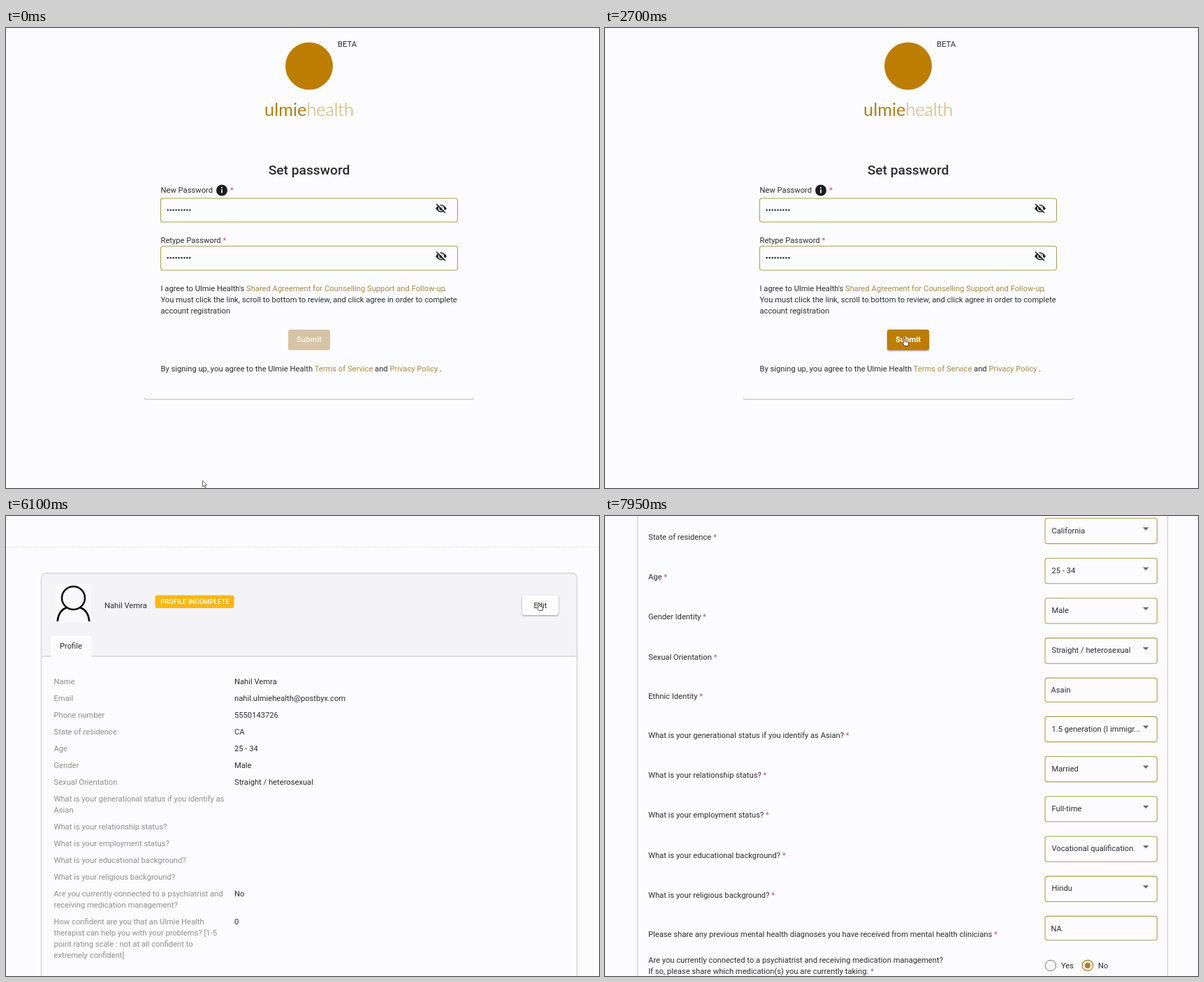
These frames come from a looping animation (849 px wide and 659 px high, 8 s). An HTML page:

```html
<!DOCTYPE html>
<html lang="en">
<head>
<meta charset="utf-8">
<title>Account set-up</title>
<style>
html, body { margin: 0; width: 100%; height: 100%; overflow: hidden; background: #fcfcfe; }
svg { display: block; width: 849px; height: 659px; font: 11.2px Roboto, sans-serif; fill: #2c2c30; }
.gold { fill: #a8893f; }
.star { fill: #c8506c; }
.grey { fill: #8d8d8b; }
.field { fill: none; stroke: #aa9f4e; stroke-width: 1.1; }
.white { fill: #fff; }
.bold { font-weight: 700; }
.mid { text-anchor: middle; }
.raised { filter: drop-shadow(0 1px 1.2px #0006); }
</style>
</head>
<body>
<svg id="stage" viewBox="0 0 849 659"></svg>
<script>
const PAPER = '#fcfcfe', LOOP = 8000;
const BRAND = 'Ulmie Health', FIRST = 'Nahil', LAST = 'Vemra';
const MAIL = 'nahil.ulmiehealth@postbyx.com', PHONE = '5550143726';

// y is the vertical middle of the line
const text = (x, y, s, cls = '', more = '') =>
  `<text x="${x}" y="${y + 4}" class="${cls}" ${more}>${s}</text>`;
const box = (x, y, w, h, fill, r = 3, more = '') =>
  `<rect x="${x}" y="${y}" width="${w}" height="${h}" rx="${r}" fill="${fill}" ${more}/>`;
const field = (x, y, w, h) => box(x, y, w, h, 'none', 3.5, 'class="field"');
const star = '<tspan class="star"> *</tspan>';
const gold = s => `<tspan class="gold">${s}</tspan>`;

function passwordField(y, h) {
  let s = field(221.5, y, 425, h);
  for (let i = 0; i < 9; i++) s += `<circle cx="${231.7 + i * 3.95}" cy="${y + 16.7}" r="1.25"/>`;
  return s + `<g transform="translate(623 ${y + 14.5})" fill="#222">
    <path d="M-8 0Q0-11 8 0Q0 11-8 0Z"/>
    <circle r="3.4" fill="none" stroke="${PAPER}" stroke-width="1.4"/>
    <path d="M-5.5-7.5L7 5" stroke="${PAPER}" stroke-width="1.6"/>
    <path d="M-7-6.5L6 6.5" stroke="#222" stroke-width="1.5"/></g>`;
}

function signUp() {
  return `<circle cx="434" cy="54.5" r="34" fill="#bd7d02"/>
    ${text(475, 23, 'BETA')}
    <text x="434" y="125.5" class="mid" font-family="Lato, sans-serif" font-size="25.3" font-weight="300"
      fill="#c8ab62"><tspan fill="#aa7f1c" font-weight="400">ulmie</tspan>health</text>
    <text x="434" y="210" class="mid" font-size="19.2" font-weight="500">Set password</text>
    ${text(221.5, 231.5, 'New Password')}
    <circle cx="309" cy="232.5" r="8" fill="#1c1c1c"/>
    <path d="M309 228v1.8M309 231.3v5.2" stroke="#fff" stroke-width="1.7"/>
    ${text(321, 231.5, '*', 'star')}
    ${passwordField(244, 34)}
    ${text(221.5, 303.5, 'Retype Password' + star)}
    ${passwordField(312.5, 34.5)}
    ${text(221.5, 373, `I agree to ${BRAND}'s`)}
    ${text(344, 373, 'Shared Agreement for Counselling Support and Follow-up', 'gold')}
    ${text(627, 373, '.')}
    ${text(221.5, 389, 'You must click the link, scroll to bottom to review, and click agree in order to complete')}
    ${text(221.5, 405, 'account registration')}
    <g id="off">${box(404, 432, 60, 29.5, '#d6c4a6')}${text(434, 446, 'Submit', 'bold mid', 'style="fill:#f5eede"')}</g>
    <g id="on">${box(404, 432, 60, 29.5, '#bd7d02', 3, 'class="raised"')}${text(434, 446, 'Submit', 'bold mid white')}</g>
    ${text(221.5, 488, `By signing up, you agree to the ${BRAND} ${gold('Terms of Service')} and ${gold('Privacy Policy')} .`)}
    <path d="M198 530q0 2 3 2H667q3 0 3-2" fill="none" stroke="#b4b4b4"/>`;
}

function cardTop(left, right) {
  const x = left - 50.5;
  return `<path d="M0 44.5H849" stroke="#d2d2da" stroke-dasharray="1.5 2"/>
    <path d="M${left} 201V90q0-8 8-8H${right - 8}q8 0 8 8V201Z" fill="#f4f4f6"/>
    <path d="M${left} 1400V90q0-8 8-8H${right - 8}q8 0 8 8V1400M${left} 201H${right}"
      fill="none" stroke="#d3d3e2" stroke-width="1.4"/>
    <g transform="translate(${x})">
      ${box(70, 97, 52, 56, '#f9f9fb')}
      <g fill="none" stroke="#0a0a0a" stroke-width="2.5"><circle cx="96.5" cy="117.5" r="16.5"/>
        <path d="M73.7 151C74.5 141 79 134 87 131M106 131C114 134 118.5 141 119.3 151"/></g>
      ${text(141, 127.5, FIRST + ' ' + LAST)}
      ${box(213.5, 113.5, 113, 18.5, '#fcb714')}
      ${text(270.5, 121.5, 'PROFILE INCOMPLETE', 'mid white', 'font-size="9.6" font-weight="500"')}
      ${box(64, 171.5, 59, 31, PAPER)}
      ${text(77, 186, 'Profile')}
    </g>`;
}
const button = (x, w, label, fill, cls) =>
  box(x, 113.5, w, 28.5, fill, 3, 'class="raised"') + text(x + w / 2, 127.5, label, 'mid ' + cls);

function profile() {
  const rows = [
    ['Name', FIRST + ' ' + LAST], ['Email', MAIL], ['Phone number', PHONE],
    ['State of residence', 'CA'], ['Age', '25 - 34'], ['Gender', 'Male'],
    ['Sexual Orientation', 'Straight / heterosexual'],
    ['What is your generational status if you identify as|Asian'],
    ['What is your relationship status?'], ['What is your employment status?'],
    ['What is your educational background?'], ['What is your religious background?'],
    ['Are you currently connected to a psychiatrist and|receiving medication management?', 'No'],
    [`How confident are you that an ${BRAND}|therapist can help you with your problems? [1-5|` +
      'point rating scale : not at all confident to|extremely confident]', '0']];
  let y = 237, s = cardTop(50.5, 817.5) + button(739, 52, 'Edit', '#fff', '');
  for (const [label, value = ''] of rows) {
    const lines = label.split('|');
    s += text(327, y, value);
    lines.forEach((line, i) => s += text(68.5, y + 16 * i, line, 'grey'));
    y += 8 + 16 * lines.length;
  }
  return s;
}

function form() {
  // label, value, is a drop-down, filled in late
  const rows = [
    ['First name', FIRST], ['Last name', LAST], ['Email', MAIL], ['Phone number', PHONE],
    ['State of residence', 'California', 1], ['Age', '25 - 34', 1], ['Gender Identity', 'Male', 1],
    ['Sexual Orientation', 'Straight / heterosexual', 1], ['Ethnic Identity', 'Asain'],
    ['What is your generational status if you identify as Asian?', '1.5 generation (I immigr...', 1, 1],
    ['What is your relationship status?', 'Married', 1, 1],
    ['What is your employment status?', 'Full-time', 1, 1],
    ['What is your educational background?', 'Vocational qualification', 1, 1],
    ['What is your religious background?', 'Hindu', 1, 1],
    ['Please share any previous mental health diagnoses you have received from mental health clinicians', 'NA', 0, 1]];
  let y = 216.3;
  let s = cardTop(46.5, 805.5) + button(655, 61, 'Cancel', '#fb5236', 'bold white') + button(728.5, 52, 'Save', '#fff', '') +
    '<clipPath id="clip"><path d="M630 0H783.5V1400H630Z"/></clipPath>';
  for (const [label, value, drop, late] of rows) {
    s += text(62, y + (drop ? 26.6 : 25.6), label + star) + field(630, y, 160.5, drop ? 36.3 : 34.4) +
      `<g clip-path="url(#clip)" ${late ? 'class="late"' : ''}>${text(drop ? 639.5 : 638.5, y + 17.3, value)}</g>`;
    if (drop) s += `<path d="M770 ${y + 13}h8.6l-4.3 4.4z" fill="#6b6b66"/>`;
    y += drop ? 57.2 : 55.25;
  }
  return s + text(62, 1070, 'Are you currently connected to a psychiatrist and receiving medication management?') +
    text(62, 1086, 'If so, please share which medication(s) you are currently taking.' + star) +
    `<circle cx="638" cy="1078" r="7.7" fill="none" stroke="#77776c"/>
     <circle cx="691" cy="1078" r="7.7" fill="none" stroke="#a8802a" stroke-width="1.3"/>
     <circle cx="691" cy="1078" r="4.2" fill="#a8802a"/>` +
    text(653, 1078, 'Yes') + text(706, 1078, 'No');
}

const $ = id => document.getElementById(id);
$('stage').innerHTML = `
  <g id="signUp">${signUp()}</g><g id="profile">${profile()}</g><g id="form">${form()}</g>
  <g id="cursor" stroke-linejoin="round">
    <path id="arrow" d="M0 0V8.5L2 6.8L3.4 10L4.8 9.4L3.5 6.3H6Z" fill="#fff" stroke="#555" stroke-width=".9"/>
    <path id="hand" d="M-1 1q1-1.6 2 0V5l4 1.2q1 .4.8 1.5L5 11.5H0L-3 7.5q0-1.6 2-.4Z" fill="#fff" stroke="#333" stroke-width=".9"/>
    <path id="beam" d="M-2 0Q0 0 0 1.5Q0 0 2 0M0 1V9M-2 10Q0 10 0 8.5Q0 10 2 10" fill="none" stroke="#333"/>
  </g>`;

// time, x, y of the pointer tip
const path = [
  [0, 281.5, 648.5], [950, 281.5, 648.5], [1150, 300, 672], [1600, 860, 672], [1650, 860, 520],
  [2150, 429, 444], [3050, 429, 444], [3700, 354, 320], [4250, 354, 320], [4900, 326, 260],
  [5200, 326, 260], [5700, 763, 124], [6950, 763, 124], [7350, 496, 261], [LOOP, 496, 261]];
const scroll = [[0, 0], [7350, 0], [7500, 89], [7850, 434], [LOOP, 434]];
const smooth = u => u * u * (3 - 2 * u);

function at(keys, t, ease = u => u) {
  const i = keys.findIndex(k => k[0] > t), a = keys[i - 1], b = keys[i];
  const u = ease((t - a[0]) / (b[0] - a[0]));
  return a.slice(1).map((v, n) => v + (b[n + 1] - v) * u);
}
const show = (el, on) => { el.style.display = on ? '' : 'none'; };
const late = document.querySelectorAll('.late');

function draw(t) {
  show($('signUp'), t < 3000);
  show($('profile'), t >= 3000 && t < 6200);
  show($('form'), t >= 6200);
  show($('off'), t < 1500);
  show($('on'), t >= 1500);
  late.forEach(el => show(el, t >= 7700));
  $('form').setAttribute('transform', `translate(0 ${-at(scroll, t)[0]})`);

  const [x, y] = at(path, t, smooth);
  const hand = (t > 2050 && t < 3000) || (t > 5620 && t < 6200);
  const beam = t > 4800 && t < 5280;
  $('cursor').setAttribute('transform', `translate(${x} ${y})`);
  show($('cursor'), t < 6250 || (t >= 6950 && t < 7800));
  show($('hand'), hand);
  show($('beam'), beam);
  show($('arrow'), !hand && !beam);
}

const start = performance.now();
function tick() {
  draw((performance.now() - start) % LOOP);
  requestAnimationFrame(tick);
}
tick();
</script>
</body>
</html>
```
